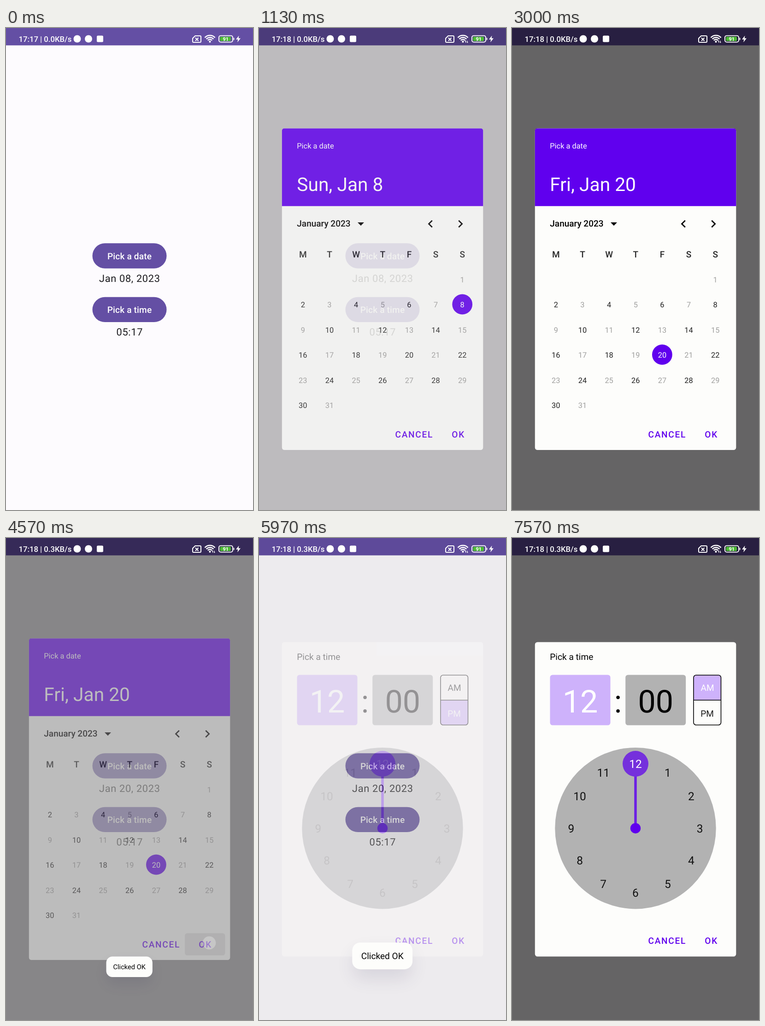
Recreate the animation shown at these times as an HTML page. Size 536 by 1044 pixels, loop 8 s.

```html
<!DOCTYPE html>
<html lang="en">
<head>
<meta charset="utf-8">
<title>Date and time picker</title>
<style>
  html, body { margin: 0; width: 100%; height: 100%; overflow: hidden; background: #fdfbfe; }
  svg { display: block; width: 100%; height: 100%; }
  text { font-family: Roboto, "Open Sans", sans-serif; white-space: pre; text-rendering: geometricPrecision; }
</style>
</head>
<body>
<svg id="stage" viewBox="0 0 536 1044" xmlns="http://www.w3.org/2000/svg"></svg>
<script>
const LOOP = 8000;
const ACCENT = '#6000ee', PRIMARY = '#644fa4', TINT = '#ceb2fb', GREY = '#b2b2b2', PAPER = '#fdfdfb';
const SMALL = 16.37, BODY = 19.1;

// Markup helpers
const attrs = o => Object.entries(o).map(([k, v]) => ` ${k}="${v}"`).join('');
const tag = (name, o, inner = '') => `<${name}${attrs(o)}>${inner}</${name}>`;
const rect = (x, y, width, height, rx, fill, more = {}) =>
  tag('rect', { x, y, width, height, rx, fill, ...more });
const circle = (cx, cy, r, fill, more = {}) => tag('circle', { cx, cy, r, fill, ...more });
const path = (d, more = {}) => tag('path', { d, fill: 'none', ...more });
const group = (id, inner, more = {}) => tag('g', { id, ...more }, inner);
const left = (s, x, y, size, fill, more = {}) =>
  tag('text', { x, y, 'font-size': size, fill, ...more }, s);
const mid = (s, x, y, size, fill, more = {}) =>
  left(s, x, y, size, fill, { 'text-anchor': 'middle', ...more });
const medium = { 'font-weight': 500 };

function wifiArc(r) {
  const dx = r * Math.sin(0.83), y = 31 - r * Math.cos(0.83);
  return path(`M${442.5 - dx} ${y}A${r} ${r} 0 0 1 ${442.5 + dx} ${y}`,
    { stroke: '#fff', 'stroke-width': 2.5 });
}

function statusIcons() {
  return left('', 27.5, 29.9, 16.7, '#fff', { id: 'clock', ...medium }) +
    circle(154.5, 23.5, 8, '#fff') +
    circle(179, 23.5, 8, '#fff') +
    rect(197, 16.5, 14, 14, 2.5, '#fff') +
    path('M410.5 17H421Q423 17 423 19V29Q423 31 421 31H407Q405 31 405 29V22.5Z' +
      'M411 21.3L417.4 27.7M417.4 21.3L411 27.7', { stroke: '#fff', 'stroke-width': 2 }) +
    [15, 10.6, 6.2].map(wifiArc).join('') + circle(442.5, 29.7, 2.1, '#fff') +
    path('M448.6 32V27.5M447 29L448.6 27.3M451.8 27.5V32M453.4 30.3L451.8 32',
      { id: 'traffic', stroke: '#fff', 'stroke-width': 1.2 }) +
    rect(462, 16.6, 30, 14, 4, 'none', { stroke: '#fff', 'stroke-width': 1.9 }) +
    rect(464.4, 19, 23.5, 9.3, 2, '#4dbb35') +
    mid('91', 476.8, 27.7, 11, '#fff', { 'font-weight': 700 }) +
    rect(493.6, 21, 1.8, 5.2, 0.9, '#fff') +
    path('M505.5 16.5L499 24.8H503.3L502.2 31L509 22.2H504.6Z', { style: 'fill:#fff' });
}

function pillButton(id, label, y) {
  return rect(187.5, y, 161, 54.4, 27.2, PRIMARY) +
    rect(187.5, y, 161, 54.4, 27.2, '#fff', { id, opacity: 0 }) +
    mid(label, 268, y + 34.3, BODY, '#fff', { 'letter-spacing': 0.14, ...medium });
}

function home() {
  const value = (id, y) => mid('', 268.3, y, 21.8, '#1c1b1f', { id, 'letter-spacing': 0.68 });
  return rect(0, 0, 536, 1044, 0, '#fdfbfe') + rect(0, 0, 536, 37.6, 0, PRIMARY) +
    pillButton('dateRipple', 'Pick a date', 466.3) + value('dateValue', 549.8) +
    pillButton('timeRipple', 'Pick a time', 582.7) + value('timeValue', 666.2);
}

function actions(y) {
  const style = { 'letter-spacing': 1.7, ...medium };
  return mid('CANCEL', 336.8, y, BODY, ACCENT, style) + mid('OK', 432.6, y, BODY, ACCENT, style);
}

const dayPos = d => [95.3 + 57.65 * ((d + 5) % 7), 545 + 54.5 * Math.floor((d + 5) / 7)];

function dateDialog() {
  let s = rect(49.8, 217.6, 436.5, 696.4, 5.5, PAPER) +
    path('M49.8 385.8V223.1Q49.8 217.6 55.3 217.6H480.8Q486.3 217.6 486.3 223.1V385.8Z',
      { style: `fill:${ACCENT}` }) +
    left('Pick a date', 82.3, 261.3, SMALL, '#fff') +
    left('', 82.3, 353.3, 40.7, '#fff', { id: 'headline' }) +
    left('January 2023', 82.3, 430, 19, '#000', medium) +
    path('M214 421H228L221 428.2Z', { style: 'fill:#000' }) +
    path('M375.8 417L368.5 424.2L375.8 431.4M433.3 417L440.6 424.2L433.3 431.4',
      { stroke: '#000', 'stroke-width': 2.8 });
  [...'MTWTFSS'].forEach((c, i) => {
    s += mid(c, 95.3 + 57.65 * i, 497, BODY, '#262626', medium);
  });
  s += circle(0, 0, 21.9, ACCENT, { id: 'picked' });
  for (let d = 1; d <= 31; d++) {
    const [x, y] = dayPos(d);
    s += mid(d, x, y + 5.8, SMALL, '#000', { id: 'day' + d });
  }
  return s + rect(388, 856, 87.5, 48, 5.5, '#000', { id: 'okPress', opacity: 0 }) + actions(887.3);
}

function timeDialog() {
  const top = 'M394 351.2V302.5Q394 297 399.5 297H448Q453.5 297 453.5 302.5V351.2Z';
  const bottom = 'M394 351.2V399.5Q394 405 399.5 405H448Q453.5 405 453.5 399.5V351.2Z';
  let numbers = '';
  for (let h = 1; h <= 12; h++) {
    const a = h * Math.PI / 6;
    numbers += mid(h, 268 + 139.7 * Math.sin(a), 637.5 - 139.7 * Math.cos(a), 24.5,
      h < 12 ? '#111' : '#fff');
  }
  return rect(49.8, 225.4, 436.5, 681.2, 5.5, PAPER) +
    left('Pick a time', 82.3, 263.8, BODY, '#000') +
    rect(82.5, 296.5, 131, 109, 5.5, TINT) + rect(246.2, 296.5, 131, 109, 5.5, GREY) +
    mid('12', 148, 378.3, 68.2, '#fff') + mid('00', 311.8, 378.3, 68.2, '#000') +
    mid(':', 230, 378.3, 68.2, '#000') +
    path(top, { id: 'amFill' }) + path(bottom, { id: 'pmFill' }) +
    rect(394, 297, 59.5, 108, 5.5, 'none', { stroke: '#000', 'stroke-width': 1.6 }) +
    path('M394 351.2H453.5', { stroke: '#000', 'stroke-width': 1.6 }) +
    mid('AM', 424, 331.2, BODY, '#000', { id: 'am' }) +
    mid('PM', 423.7, 386.5, BODY, '#000', { id: 'pm' }) +
    circle(268, 628.7, 174.7, GREY) +
    path('M268 628.7V505', { stroke: '#6c1fe4', 'stroke-width': 5.5 }) +
    circle(268, 628.7, 11.2, ACCENT) + circle(268, 489, 28, '#7530dc') +
    group('numbers', numbers) + actions(879.3);
}

const stage = document.getElementById('stage');
stage.innerHTML =
  `<defs><filter id="soft" x="-80%" y="-130%" width="260%" height="360%">
    <feGaussianBlur stdDeviation="19"/></filter></defs>` +
  home() + rect(0, 0, 536, 1044, 0, '#000', { id: 'scrim', opacity: 0 }) +
  group('dateBox', dateDialog()) + group('timeBox', timeDialog()) +
  circle(441, 877, 14.3, '#fff', { id: 'touch', opacity: 0 }) +
  group('toast',
    rect(-63, -9, 126, 58, 18, '#2a2050', { opacity: 0.11, filter: 'url(#soft)' }) +
    rect(-65.5, -29, 131, 58, 17.5, PAPER) + mid('Clicked OK', 0, 7, BODY, '#000')) +
  statusIcons();

const ui = {};
stage.querySelectorAll('[id]').forEach(e => { ui[e.id] = e; });

const clamp = v => Math.max(0, Math.min(1, v));
const ramp = (t, from, to) => clamp((t - from) / (to - from));
const pulse = (t, a, b, c, d) => ramp(t, a, b) * (1 - ramp(t, c, d));
const set = (e, name, v) => e.setAttribute(name, v);
const write = (e, s) => { if (e.textContent !== s) e.textContent = s; };

function fade(e, v) {
  set(e, 'opacity', v);
  set(e, 'display', v > 0 ? 'inline' : 'none');
}

// Dialogs fade linearly, the dimming behind them accelerates.
const opened = (t, start) => ramp(t, start, start + 250);
const dimmed = (t, start, length) => ramp(t, start, start + length) ** 2;

function drawDates(t) {
  const day = t < 2000 ? 8 : t < 3000 ? 26 : 20;
  const [x, y] = dayPos(day);
  write(ui.headline, { 8: 'Sun, Jan 8', 26: 'Thu, Jan 26', 20: 'Fri, Jan 20' }[day]);
  set(ui.picked, 'cx', x);
  set(ui.picked, 'cy', y - 1);
  for (let d = 1; d <= 31; d++) {
    const e = ui['day' + d];
    set(e, 'fill', d === day ? '#fff' : '#000');
    set(e, 'fill-opacity', d === day ? 1 : d % 2 ? 0.37 : 0.87);
  }
}

function drawHalf(name, on) {
  ui[name + 'Fill'].style.fill = on ? TINT : PAPER;
  set(ui[name], 'fill', on ? '#fff' : '#1c1c1c');
}

function drawToast(t) {
  const age = Math.max(0, t - 4470);
  const out = ramp(t, 6500, 6730);
  const spring = (size, damping, speed) => size * Math.exp(-damping * age) * Math.cos(speed * age);
  const scale = 1 - spring(0.5, 0.00405, 0.0078) - 0.3 * out * out;
  const y = 905 + spring(50.6, 0.00364, 0.0082) + 25 * out * out;
  set(ui.toast, 'transform', `translate(267.7 ${y}) scale(${scale})`);
  fade(ui.toast, ramp(t, 4470, 4550) * (1 - out));
}

function draw(t) {
  write(ui.clock, `${t < 430 ? '17:17' : '17:18'} | ${t < 3730 ? '0.0' : '0.3'}KB/s`);
  fade(ui.traffic, t < 430 ? 0 : 1);
  write(ui.dateValue, t < 4440 ? 'Jan 08, 2023' : 'Jan 20, 2023');
  write(ui.timeValue, '05:17');
  fade(ui.dateRipple, 0.1 * pulse(t, 640, 720, 820, 1000));
  fade(ui.timeRipple, 0.1 * pulse(t, 5670, 5740, 5800, 5950));

  fade(ui.dateBox, opened(t, 925) * (1 - ramp(t, 4470, 4655)));
  fade(ui.timeBox, opened(t, 5878));
  fade(ui.numbers, ramp(t, 5930, 6080));
  const dim = t < 5000
    ? dimmed(t, 925, 316) * (1 - dimmed(t, 4470, 213))
    : dimmed(t, 5870, 316);
  fade(ui.scrim, 0.6 * dim);
  fade(ui.okPress, 0.1 * ramp(t, 4400, 4500));
  fade(ui.touch, 0.28 * pulse(t, 4400, 4430, 4570, 4680));

  drawDates(t);
  drawHalf('am', t >= 7030);
  drawHalf('pm', t < 7030);
  drawToast(t);
}

const start = performance.now();
function tick() {
  draw((performance.now() - start) % LOOP);
  requestAnimationFrame(tick);
}
draw(0);
requestAnimationFrame(tick);
</script>
</body>
</html>
```
